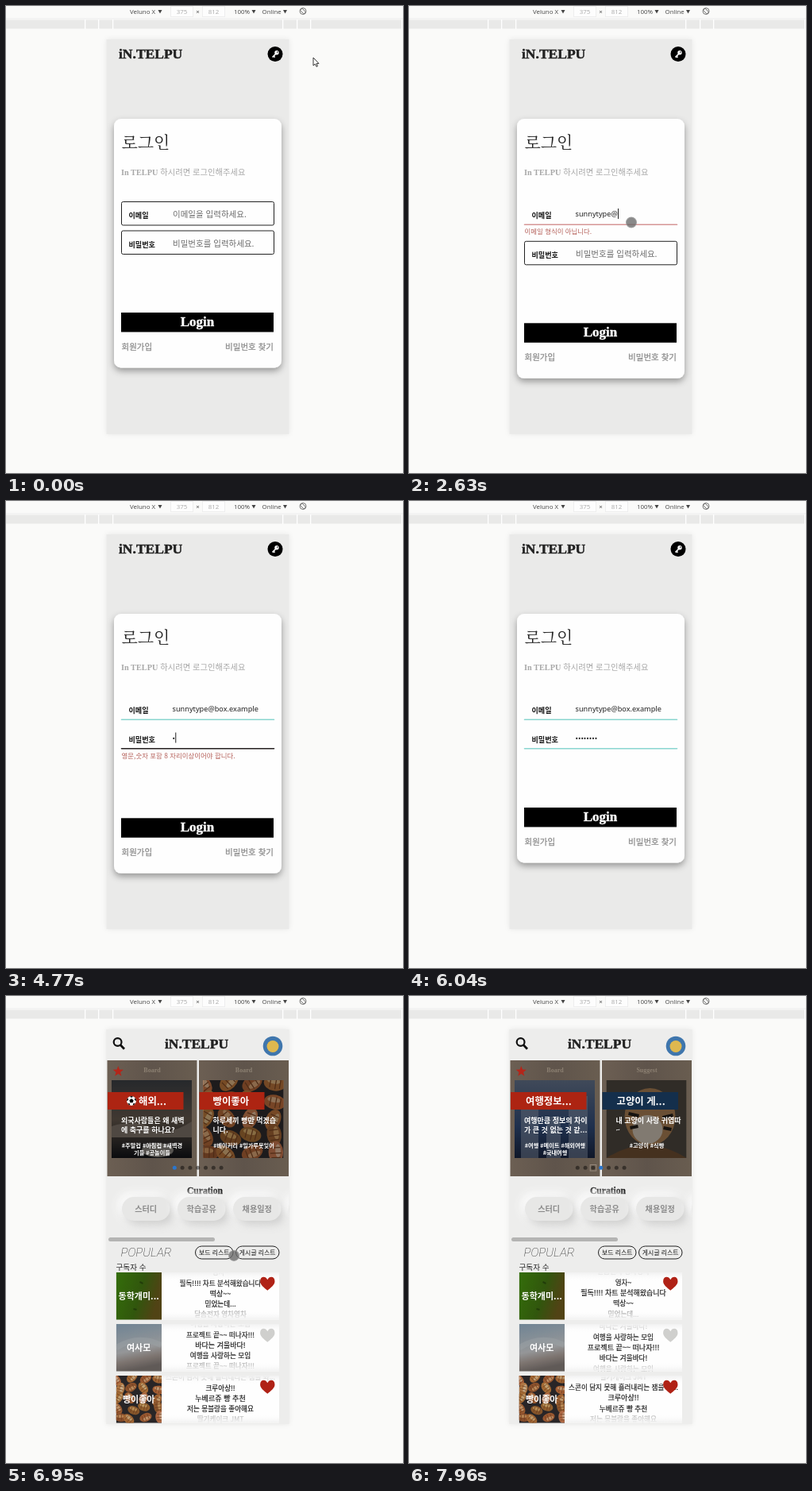
Recreate the animation shown at these times as an HTML page. Size 500 by 588 pixels, loop 8 s.

```html
<!DOCTYPE html>
<html lang="ko">
<head>
<meta charset="utf-8">
<style>
html, body { margin: 0; width: 100%; height: 100%; overflow: hidden; background: #fafaf9; }
svg { display: block; }
text { font-family: "Noto Sans CJK KR", "Noto Sans CJK JP", "Noto Sans", sans-serif; white-space: pre; }
.didot { font-family: "Liberation Serif", serif; font-weight: 700; }
.logo { font-size: 17.5px; fill: #222; stroke: #222; stroke-width: .5; }
.bar { font: 7.9px "Open Sans", "Noto Sans", sans-serif; fill: #444; }
.typed { font: 9.2px "Noto Sans", sans-serif; fill: #222; }
.hint { font-size: 10.5px; font-weight: 300; fill: #6a6a6a; }
.label { font-size: 9.1px; font-weight: 700; fill: #111; }
.err { font-size: 8.45px; font-weight: 300; fill: #b5605a; }
.link { font-size: 10.5px; fill: #8a8a8a; stroke: #8a8a8a; stroke-width: .25; }
.item { text-anchor: middle; fill: #222; stroke: #222; stroke-width: .22; }
.mid { text-anchor: middle; }
.white { fill: #fff; font-weight: 700; }
.soft { filter: drop-shadow(5px 5px 6px #cdcdcc) drop-shadow(-5px -5px 6px #fcfcfc); }
</style>
</head>
<body>
<svg id="stage" width="500" height="588" viewBox="0 0 500 588">
  <defs>
    <linearGradient id="brown" x2="1"><stop stop-color="#6c5f53"/><stop offset=".5" stop-color="#5f544b"/><stop offset="1" stop-color="#695d50"/></linearGradient>
    <linearGradient id="green" x2="1" y2=".3"><stop stop-color="#3b7d0c"/><stop offset=".6" stop-color="#38620f"/><stop offset="1" stop-color="#5c4c18"/></linearGradient>
    <linearGradient id="sky" y2="1" x2=".2"><stop stop-color="#7f96a9"/><stop offset=".6" stop-color="#a9abad"/><stop offset=".8" stop-color="#8f8580"/><stop offset="1" stop-color="#6d6663"/></linearGradient>
    <linearGradient id="night" y2="1" x2="0"><stop stop-color="#3c3f44"/><stop offset=".5" stop-color="#64584d"/><stop offset="1" stop-color="#101216"/></linearGradient>
    <linearGradient id="blue" y2="1" x2="0"><stop stop-color="#64738b"/><stop offset=".6" stop-color="#2f4a78"/><stop offset="1" stop-color="#182440"/></linearGradient>
    <linearGradient id="fade" y2="1" x2="0"><stop stop-color="#f1f1f1"/><stop offset=".2" stop-color="#fff" stop-opacity="0"/><stop offset=".8" stop-color="#fff" stop-opacity="0"/><stop offset="1" stop-color="#f1f1f1"/></linearGradient>
    <filter id="cardShadow" x="-20%" y="-20%" width="140%" height="140%"><feDropShadow dx="0" dy="4" stdDeviation="4.5" flood-opacity=".36"/></filter>
    <filter id="thin" x="-20%" y="-20%" width="140%" height="140%"><feDropShadow dx="0" dy="0" stdDeviation="3" flood-opacity=".08"/></filter>
  </defs>
  <rect width="500" height="588" fill="#fafaf9"/>
  <g id="tools"></g>
  <rect x="126.5" y="42" width="230" height="497" fill="#eaeae9" filter="url(#thin)"/>

  <g id="login">
    <text class="didot logo" x="142" y="66">iN.TELPU</text>
    <circle cx="339" cy="60.5" r="9.5"/>
    <path d="M340 60 L335.5 64.5 M337 63 l1.6 1.6" stroke="#fff" stroke-width="1.7"/>
    <circle cx="341" cy="58.7" r="2.7" fill="#fff"/><circle cx="341.8" cy="58" r=".8"/>
    <rect id="card" x="136" y="142" width="211" height="314" rx="9" fill="#fefefe" filter="url(#cardShadow)"/>
    <text x="145.5" y="179" font-size="21" font-weight="300" fill="#222" style="font-family:'Noto Serif CJK KR','Noto Sans CJK KR',serif">로그인</text>
    <text x="145" y="213" font-size="10.3" font-weight="300" fill="#a8a8a8"><tspan class="didot">In TELPU</tspan> 하시려면 로그인해주세요</text>
    <g id="email"></g>
    <g id="pass"></g>
    <g id="below">
      <rect x="145" y="386" width="192" height="24.5"/>
      <text class="didot mid" x="241" y="403" font-size="17" fill="#fff" stroke="#fff" stroke-width=".4">Login</text>
      <text class="link" x="145.5" y="433">회원가입</text>
      <text class="link" x="337" y="433" text-anchor="end">비밀번호 찾기</text>
    </g>
  </g>

  <g id="main"></g>
  <path id="arrow" d="M0 0 V10 L2.3 8 L4 11.4 L5.5 10.7 L4 7.4 H7 Z" fill="#fff" stroke="#222" stroke-width=".9"/>
  <circle id="touch" r="6.4" stroke-width="1.2"/>
</svg>
<script>
const $ = id => document.getElementById(id);
const T = (x, y, s, attrs = '') => `<text x="${x}" y="${y}" ${attrs}>${s}</text>`;
const R = (x, y, w, h, attrs = '') => `<rect x="${x}" y="${y}" width="${w}" height="${h}" ${attrs}/>`;
const box = (x, y, w, h, inner) => `<svg x="${x}" y="${y}" width="${w}" height="${h}">${inner}</svg>`;
const show = (el, on) => el.setAttribute('visibility', on ? 'visible' : 'hidden');
const move = (el, x, y) => el.setAttribute('transform', `translate(${x} ${y})`);
const clamp = v => Math.min(1, Math.max(0, v));
const smooth = v => v * v * (3 - 2 * v);
const mod = (a, n) => ((a % n) + n) % n;

// Value(s) at time t from [time, ...values] keys
function track(keys, t, ease = v => v) {
  if (t <= keys[0][0]) return keys[0].slice(1);
  const i = keys.findIndex(k => k[0] > t);
  if (i < 0) return keys[keys.length - 1].slice(1);
  const a = keys[i - 1], b = keys[i], f = ease((t - a[0]) / (b[0] - a[0]));
  return a.slice(1).map((v, j) => v + (b[j + 1] - v) * f);
}

// Toolbar
const tri = x => `<path d="M${x} 5h5l-2.5 4.5z" fill="#444"/>`;
$('tools').innerHTML =
  T(156, 10, 'Veluno X', 'class="bar"') + tri(191.5) +
  [207, 247].map((x, i) => R(x + .5, .5, 28, 13, 'fill="#fdfdfd" stroke="#eee"') +
    T(x + 14.5, 10, [375, 812][i], 'class="bar mid" style="fill:#aaa"')).join('') +
  T(241.5, 10.3, '×', 'class="bar mid"') +
  T(287, 10, '100%', 'class="bar"') + tri(309.5) +
  T(322.5, 10, 'Online', 'class="bar"') + tri(349) +
  `<g fill="none" stroke="#666" stroke-width=".9"><circle cx="374" cy="6.5" r="4"/><rect x="372.3" y="3.2" width="3.4" height="6.6" rx=".8" transform="rotate(-45 374 6.5)"/></g>` +
  R(0, 15.5, 500, 1, 'fill="#eee"') + R(0, 17.5, 500, 11, 'fill="#e9e9e8"') +
  [99, 116, 134, 348, 366, 383, 498].map(x => R(x, 17, 1.3, 12, 'fill="#fff"')).join('');

// Form fields
const MAIL = 'sunnytype@box.example';
const MAIL_KEYS = [1030, 1140, 1400, 1500, 1820, 2270, 2340, 2420, 2500, 2580, 2670, 2760, 2850, 2940, 3030, 3090, 3190, 3290, 3390, 3480, 3630];
const PASS_KEYS = [4700, 4930, 5090, 5160, 5230, 5310, 5400, 5500];
const BLACK = [20, 20, 20], RED = [214, 150, 150], TEAL = [138, 214, 208];

function makeField(id, y, label, hint, err) {
  const g = $(id);
  g.innerHTML = R(145.5, y + .5, 192, 29.5, 'rx="2" fill="none" stroke="#222"') +
    `<path d="M145.5 ${y + 29.3}H337.5" stroke-width="1.6" stroke-linecap="round"/>` +
    T(154.5, y + 21, label, 'class="label"') + T(210, y + 20, hint, 'class="hint"') +
    T(209.5, y + 19, '', 'class="typed"') + T(145.5, y + 41, err, 'class="err"') +
    R(0, y + 9, 1, 13, 'fill="#222"');
  const [frame, line, , ph, typed, error, caret] = g.children;
  return { g, frame, line, ph, typed, error, caret };
}
const email = makeField('email', 246, '이메일', '이메일을 입력하세요.', '이메일 형식이 아닙니다.');
const pass = makeField('pass', 282.5, '비밀번호', '비밀번호를 입력하세요.', '영문,숫자 포함 8 자리이상이어야 합니다.');

function drawField(f, t, text, focusAt, blurAt, badAt, goodAt, blink) {
  const on = t >= focusAt, n = text.length;
  show(f.frame, !on);
  show(f.line, on);
  const rgb = track([[badAt, ...BLACK], [badAt + 400, ...RED], [goodAt, ...RED], [goodAt + 400, ...TEAL]], t, smooth);
  f.line.setAttribute('stroke', `rgb(${rgb.map(Math.round)})`);
  show(f.ph, !n);
  if (f.typed.textContent !== text) f.typed.textContent = text;
  const bad = t >= badAt && t < goodAt;
  show(f.error, bad);
  f.caret.setAttribute('x', 209.8 + (n ? f.typed.getComputedTextLength() : 0));
  show(f.caret, on && t < blurAt && !blink);
  return bad;
}

function drawLogin(t) {
  const typed = keys => keys.filter(k => t >= k).length;
  const badMail = drawField(email, t, MAIL.slice(0, typed(MAIL_KEYS)), 870, 4310, 1030, 3440, t >= 3850 && t < 4150);
  const badPass = drawField(pass, t, '•'.repeat(typed(PASS_KEYS)), 4310, 9000, 4700, 5500, t >= 5865);
  const drop = badMail || badPass ? 13.3 : 0;
  move(pass.g, 0, badMail ? 13.3 : 0);
  move($('below'), 0, drop);
  $('card').setAttribute('height', 313.5 + drop);
}

// Pictures
function bread(w, h) {
  let seed = 7, s = R(0, 0, w, h, 'fill="#2d2a2c"');
  const rnd = () => (seed = (seed * 16807) % 2147483647) / 2147483647;
  const step = w / 3.6;
  for (let y = 0; y < h + step; y += step * .8)
    for (let x = 0; x < w + step; x += step) {
      const cx = x + rnd() * 8, cy = y + rnd() * 6, a = rnd() * 180;
      const hue = 20 + rnd() * 10, light = 38 + rnd() * 18;
      s += `<g transform="translate(${cx} ${cy}) rotate(${a}) scale(${step / 20})"><ellipse rx="9.8" ry="6.6" fill="hsl(${hue} 52% ${light}%)"/>` +
        `<ellipse cx="-1" cy="-2" rx="6" ry="2.4" fill="hsl(${hue + 6} 55% ${light + 20}%)"/>` +
        '<path d="M-4 -4v8M1 -5v10M5 -4v8" stroke="#7a4523" stroke-width=".9"/></g>';
    }
  return s;
}
const flat = id => (w, h) => R(0, 0, w, h, `fill="url(#${id})"`);
const pics = {
  bread,
  sky: (w, h) => flat('sky')(w, h) + `<path d="M0 ${h * .5} Q${w * .5} ${h * .2} ${w} ${h * .45}" fill="none" stroke="#b5bbc0" stroke-width="7" opacity=".4"/>`,
  stock: (w, h) => flat('green')(w, h) + '<path d="M30 12l4 2M38 34l5-3M22 46l4 1" stroke="#26450a" stroke-width="2"/>',
  ball: (w, h) => flat('night')(w, h) + '<path d="M0 58 Q30 48 50 60 T101 52 V72 H0z" fill="#7c7067"/><ellipse cx="58" cy="88" rx="20" ry="9" fill="#85807a"/>',
  trip: (w, h) => flat('blue')(w, h) + '<path d="M8 98V30h22v68M40 98V46h18v52M68 98V20h24v78" fill="#8b98ad" opacity=".55"/>',
  cat: (w, h) => R(0, 0, w, h, 'fill="#4b443d"') + '<ellipse cx="55" cy="46" rx="32" ry="36" fill="#a57b51"/><ellipse cx="52" cy="62" rx="19" ry="18" fill="#c9beb0"/><path d="M32 20l14 8M78 20l-14 8M28 42l13 3M84 44l-13 3M30 60l10-2M82 62l-10-2" stroke="#221d19" stroke-width="4"/><path d="M0 98Q50 66 101 98z" fill="#6b4c31"/>'
};
const football = '<circle cx="31" cy="51" r="6" fill="#f4f4f4"/><path d="M31 48.3l2.6 1.9-1 3h-3.2l-1-3z"/>' +
  [0, 72, 144, 216, 288].map(a => `<path transform="rotate(${a} 31 51)" d="M29 45.4a6 6 0 0 1 4 0L31 47z"/>`).join('');

// Carousel cards
const W = 115.5;
const cards = [
  ['Board', 1, 'ball', 40, '해외...', ['외국사람들은 왜 새벽', '에 축구를 하나요?'], ['#주말컵 #아침컵 #새벽경', '기들 #공놀이들'], football],
  ['Board', 0, 'bread', 18, '빵이좋아', ['하루세끼 빵만 먹겠습', '니다.'], ['#베이커리 #밀가루못잊어']],
  ['Board', 1, 'stock', 20, '동학개미...', ['오늘도 차트를 함께', '보는 모임'], ['#차트 #개미']],
  ['Board', 1, 'trip', 20, '여행정보...', ['여행만큼 정보의 차이', '가 큰 것 없는 것 같...'], ['#여행 #메이트 #해외여행', '#국내여행']],
  ['Suggest', 0, 'cat', 19, '고양이 게...', ['내 고양이 사랑 귀엽따', '~'], ['#고양이 #식빵']]
];
const star = (x, y, r) => `<polygon fill="#b3261a" points="${Array.from({ length: 10 }, (_, i) => {
  const a = i * Math.PI / 5, q = i % 2 ? r * .42 : r;
  return `${x + q * Math.sin(a)},${y - q * Math.cos(a)}`;
}).join(' ')}"/>`;
const cardSvg = ([head, fav, pic, x, name, body, tags, icon = ''], i) => `<g transform="translate(${i * W} 0)">` +
  R(.5, 0, 113, 146, 'fill="url(#brown)"') +
  T(57, 15, head, 'class="didot mid" font-size="8" fill="#8c8072"') +
  (fav ? star(14.3, 14, 7) : '') +
  box(6, 25, 101, 98, pics[pic](101, 98) + R(0, 0, 101, 98, 'opacity=".36"')) +
  R(1, 40, name.endsWith('...') ? 95.5 : 82, 22, `fill="${head === 'Board' ? '#ad2412' : '#142f4c'}"`) +
  icon + T(x, 55.5, name, 'class="white" font-size="12.4"') +
  body.map((s, j) => T(18, 78.5 + j * 12, s, 'class="white" font-size="9"')).join('') +
  tags.map((s, j) => T(57, 109.5 + j * 9, s, 'class="white mid" font-size="7.2"')).join('') + '</g>';

// Scrolling lists
const PITCH = 13.3;
const rows = [
  { y: 348, pic: 'stock', name: '동학개미...', heart: '#b02216', at: 14, end: [29.5, 25], items: ['떡상~~', '믿었는데...', '달솜전자 영차영차', '영차~', '필독!!!! 차트 분석해왔습니다'] },
  { y: 413, pic: 'sky', name: '여사모', heart: '#cfcfcd', at: 14, end: [29, 29], items: ['바다는 겨울바다!', '여행을 사랑하는 모임', '프로젝트 끝~~ 떠나자!!!'] },
  { y: 478, pic: 'bread', name: '빵이좋아', heart: '#b02216', at: 16, end: [27, 25.5], items: ['누베르쥬 빵 추천', '저는 몽블랑을 좋아해요', '딸기케이크 JMT', '스콘이 담지 못해 흘러내리는 잼을 봐...', '크루아상!!'] }
];
const heart = (x, y, c) => `<path transform="translate(${x} ${y})" fill="${c}" d="M0 8.5C-4 5-9.2 1.8-9.2-3C-9.2-9.4-2.5-10.2 0-5C2.5-10.2 9.2-9.4 9.2-3C9.2 1.8 4 5 0 8.5z"/>`;
const rowSvg = r => box(138.5, r.y, 205.5, Math.min(59.5, 538.5 - r.y),
  R(0, 0, 206, 60, 'fill="#fefefe"') +
  '<g class="list">' + T(131.5, 0, '', 'class="item"').repeat(7) + '</g>' +
  R(57.5, 0, 148, 59.5, 'fill="url(#fade)"') +
  box(0, 0, 57.5, 60, pics[r.pic](57.5, 60) + R(0, 0, 58, 60, 'opacity=".12"')) +
  T(28.7, 34, r.name, 'class="white mid" font-size="11"') + heart(190.8, 14.2, r.heart));

const pill = (x, w, s) => R(x, 315, w, 16, 'rx="8" fill="none" stroke="#222"') + T(x + w / 2, 326, s, 'class="mid" font-size="7.9" fill="#111"');
$('main').innerHTML =
  R(126.5, 42, 230, 497, 'fill="#ededec"') +
  '<g fill="none" stroke="#111" stroke-width="2.2"><circle cx="140.6" cy="58" r="4.9"/><path d="M144 61.5L149 66.7" stroke-width="2.8"/></g>' +
  T(240, 66, 'iN.TELPU', 'class="didot logo mid"') +
  '<circle cx="336" cy="63" r="12.3" fill="#3f76ad"/><circle cx="336" cy="63.5" r="7.5" fill="#dfb84f"/>' +
  box(127, 81, 229.5, 146, `<g id="slides">${cards.map(cardSvg).join('')}</g>`) +
  '<g id="dots">' + [0, 1, 2, 3, 4, 5, 6].map(i => `<circle cx="${212.3 + i * 9.8}" cy="216.3" r="2.5"/>`).join('') + '</g>' +
  R(228.2, 212.5, 7.6, 7.6, 'id="focus" fill="none" stroke="#96897c"') +
  T(250.5, 249, 'Curation', 'class="didot mid" font-size="11.6" fill="#111" stroke="#111" stroke-width=".3"') +
  box(126.5, 236, 230, 66, ['스터디', '학습공유', '채용일정', ''].map((s, i) =>
    R(19.5 + i * 70, 17, 60.5, 30, 'rx="15" fill="#e7e7e6" class="soft"') +
    T(49.7 + i * 70, 36, s, 'class="mid" font-size="10.1" font-weight="700" fill="#8b8b8b"')).join('')) +
  R(129, 304, 134, 5, 'rx="2.5" fill="#b4b4b3"') +
  T(144.5, 327.5, 'POPULAR', 'font-size="15.3" font-weight="200" font-style="italic" fill="#222" style="font-family:Roboto,sans-serif"') +
  pill(238.5, 47.5, '보드 리스트') + pill(289.5, 54.5, '게시글 리스트') +
  T(138.5, 345, '구독자 수', 'font-size="9.6" fill="#222"') +
  rows.map(rowSvg).join('');
const lists = [...document.querySelectorAll('.list')].map(g => [...g.children]);
const dots = [...$('dots').children];

function drawMain(t) {
  const slid = 1 - Math.pow(1 - clamp((t - 7460) / 420), 3);
  move($('slides'), -3 * W * slid, 0);
  const active = t < 7460 ? 0 : 3;
  dots.forEach((d, i) => d.setAttribute('fill', i === active ? '#2b76cc' : 'rgba(0,0,0,.45)'));
  show($('focus'), t >= 7340);
  rows.forEach((r, n) => {
    const [off] = track([[6210, -PITCH], [6580, 0], [7010, PITCH], [7440, r.end[0]], [7960, r.end[1]]], t, smooth);
    const pos = r.at + off, first = Math.floor(pos / PITCH);
    lists[n].forEach((el, k) => {
      const s = r.items[mod(k - 1 - first, r.items.length)];
      if (el.textContent !== s) el.textContent = s;
      const y = mod(pos, PITCH) + (k - 1) * PITCH, far = Math.abs(y - 29);
      el.setAttribute('y', y + 3.2);
      el.setAttribute('font-size', 8.6 + .5 * clamp(1 - far / PITCH));
      el.setAttribute('opacity', clamp(1.2 - .8 * clamp((far - 14) / 10)));
    });
  });
}

const PATH_IN = [[30, 387, 65], [400, 364, 180], [820, 280, 272.5]];
const PATH_MAIN = [[6380, 345, 395], [6580, 303, 379], [7000, 285, 320], [7340, 232, 217], [7440, 249, 223.5], [7560, 262, 240]];

function drawPointer(t) {
  const [x, y] = track(t < 6000 ? PATH_IN : PATH_MAIN, t);
  const outside = x > 357;
  show($('arrow'), outside);
  show($('touch'), !outside && (t < 3990 || t >= 6380 && t < 7560));
  move($('arrow'), x, y);
  move($('touch'), x, y);
  const dark = t >= 7300;
  $('touch').setAttribute('fill', dark ? 'rgba(45,42,42,.85)' : 'rgba(105,105,105,.78)');
  $('touch').setAttribute('stroke', dark ? 'rgba(40,40,40,.5)' : 'rgba(150,150,150,.8)');
}

const start = performance.now();
function tick() {
  const t = (performance.now() - start) % 8000, home = t >= 6210;
  $('login').style.display = home ? 'none' : '';
  $('main').style.display = home ? '' : 'none';
  if (home) drawMain(t); else drawLogin(t);
  drawPointer(t);
  requestAnimationFrame(tick);
}
tick();
</script>
</body>
</html>
```
